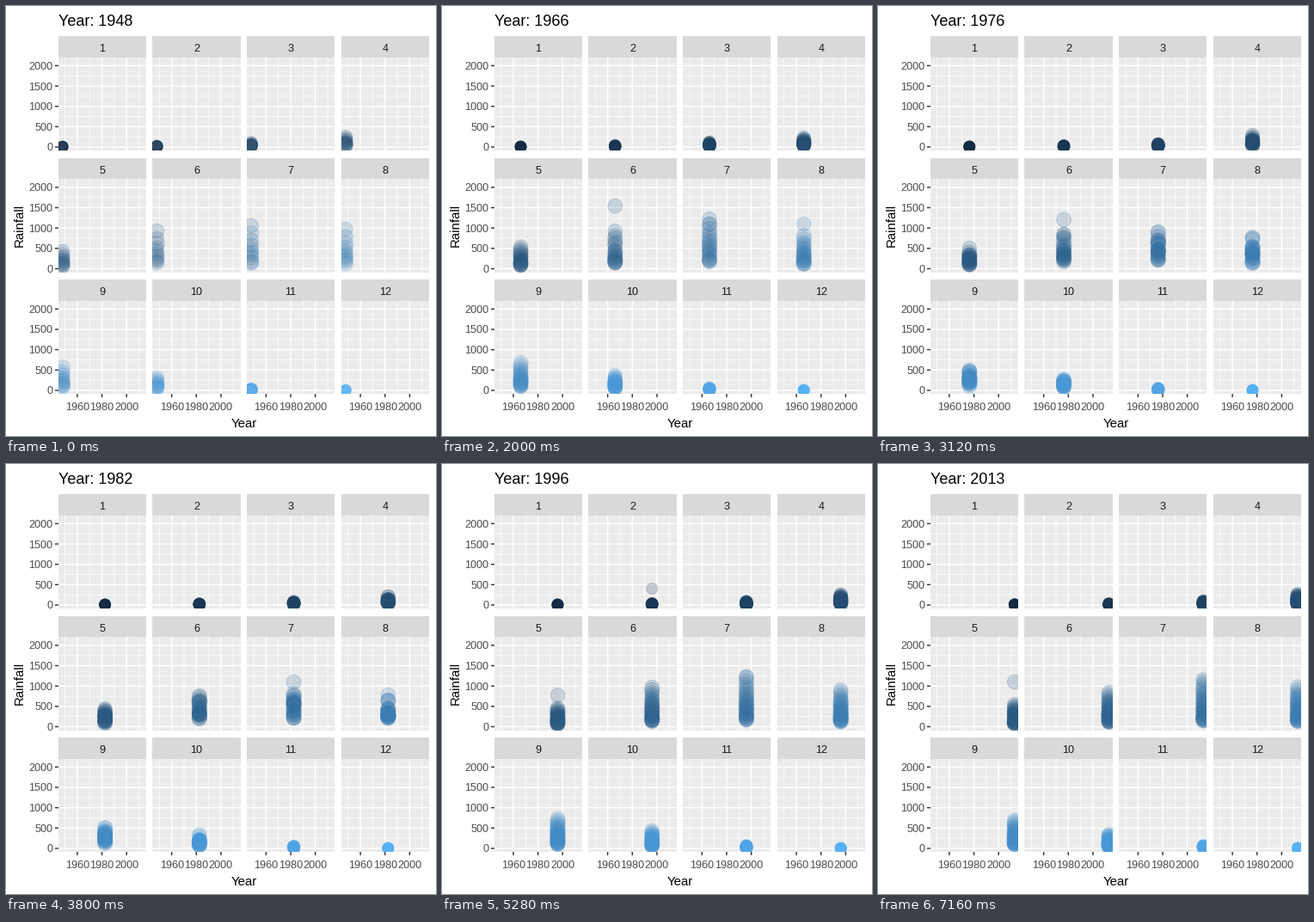
Animation, 500 px wide and 500 px high, one loop 8000 ms. Source, as a matplotlib script:

```python
import numpy as np
import matplotlib.pyplot as plt
from matplotlib.animation import FuncAnimation
from matplotlib.colors import LinearSegmentedColormap
from matplotlib.patches import Rectangle

SIZE, DPI = 500, 100
PX = 72 / DPI                      # points per pixel
FRAMES, INTERVAL = 200, 40
LAST = FRAMES - 21                 # the final year rests to the end of the loop
START, SPAN = 1948, 65
STATIONS = 35

# Panel layout, in pixels from the top left
LEFT, COL_STEP, PANEL_W = 61.07, 109.73, 102.4
TOP, ROW_STEP = 35.5, 141.5
STRIP_H, PANEL_H = 24.5, 108.9
X_SCALE = PANEL_W / 1.1 / SPAN
Y_SCALE = 0.0473

plt.rcParams["font.family"] = "Liberation Sans"
rng = np.random.default_rng(12)

# ---- data -------------------------------------------------------------

MEAN = np.array([7, 18, 45, 110, 240, 430, 470, 390, 290, 170, 28, 5])
# Exceptional rainfall: year, month, amount
STORMS = [(1948, 7, 1060), (1948, 8, 970), (1956, 5, 980), (1966, 6, 1540),
          (1966, 7, 1100), (1966, 8, 1100), (1976, 6, 1600), (1989, 7, 1580),
          (1989, 9, 1130), (1996, 2, 400), (1996, 5, 770), (1996, 7, 1230),
          (2013, 5, 1100), (2013, 7, 1150)]

years = np.arange(SPAN + 1)
marks = np.round(years * LAST / SPAN)
# The network of stations grows quickly, then levels off
counts = np.round(10 + (STATIONS - 10) * np.sin(np.pi / 2 * years / SPAN))
counts = counts.astype(int)

radius = 5.9 + 2.5 * (1 - np.exp(-MEAN / 60))
radius = radius[:, None] + rng.normal(0, 0.22, (12, STATIONS))


def spread(n):
    """Shares of the monthly mean for n stations: dense low, thin high."""
    u = rng.permutation((np.arange(n) + 0.5) / n)
    return 0.3 + 1.5 * u ** 1.4 + 0.5 * u ** 8


def make_rain():
    rain = np.zeros((SPAN + 1, 12, STATIONS))
    for k, n in enumerate(counts):
        for m, mean in enumerate(MEAN):
            rain[k, m, :n] = mean * rng.lognormal(0, 0.12) * spread(n)
    for year, month, amount in STORMS:
        rain[year - START, month - 1, 0] = amount
    return rain


def year_step(frame):
    """Years since the start, and the share of the way to the next."""
    step = round(float(np.interp(frame, marks, years)), 6)
    return int(step), step - int(step)


rain = make_rain()

# ---- stage ------------------------------------------------------------

fig = plt.figure(figsize=(SIZE / DPI, SIZE / DPI), dpi=DPI, facecolor="white")
ax = fig.add_axes([0, 0, 1, 1])
ax.set(xlim=(0, SIZE), ylim=(SIZE, 0))
ax.axis("off")


def year_x(col, year):
    return LEFT + col * COL_STEP + PANEL_W / 22 + (year - START) * X_SCALE


def rain_y(row, value):
    floor = TOP + row * ROW_STEP + STRIP_H + PANEL_H
    return floor - PANEL_H / 22 - value * Y_SCALE


def label(x, y, text, px=12.6, color="#4D4D4D", **kw):
    return ax.text(x, y, text, fontsize=px * PX, color=color, **kw)


def line(x0, y0, x1, y1, color="white", width=1.42):
    ax.plot([x0, x1], [y0, y1], color=color, lw=width * PX, zorder=2,
            solid_capstyle="butt", snap=False)


def box(x0, y0, x1, y1, color):
    patch = Rectangle((x0, y0), x1 - x0, y1 - y0, fc=color, lw=0, zorder=1)
    return ax.add_patch(patch)


def make_panel(m):
    row, col = divmod(m, 4)
    x0, x1 = (int(LEFT + col * COL_STEP + d) for d in (0, PANEL_W))
    y0, y1, y2 = (int(TOP + row * ROW_STEP + d)
                  for d in (0, STRIP_H, STRIP_H + PANEL_H))
    box(x0, y0, x1, y1, "#D9D9D9")
    back = box(x0, y1, x1, y2, "#EBEBEB")
    label((x0 + x1) / 2, y0 + 18, str(m + 1), color="#1A1A1A", ha="center")

    for year in range(1950, 2011, 10):
        x = year_x(col, year)
        major = year % 20 == 0
        line(x, y1, x, y2, width=1.42 if major else 0.71)
        if major and row == 2:
            line(x, y2, x, y2 + 4, "#333333")
            label(x, 469.5, str(year), ha="center")
    for value in range(0, 2001, 250):
        y = rain_y(row, value)
        major = value % 500 == 0
        line(x0, y, x1, y, width=1.42 if major else 0.71)
        if major and col == 0:
            line(x0 - 4, y, x0, y, "#333333")
            label(54.5, y + 4.5, str(value), ha="right")

    color = shades(m / 11)[:3] + (0.2,)
    dots = ax.scatter([], [], facecolors=[color], edgecolors=[color],
                      linewidths=PX, zorder=3)
    dots.set_clip_path(back)
    return dots


shades = LinearSegmentedColormap.from_list(
    "month", ["#132B43", "#326A98", "#56B1F7"])
panels = [make_panel(m) for m in range(12)]

label(276.5, 490, "Year", 15, "black", ha="center")
label(20, 255, "Rainfall", 15, "black", ha="center", va="baseline",
      rotation=90, rotation_mode="anchor")
title = label(61, 23, "", 18, "black")


def draw(frame):
    frame = min(frame, LAST)
    title.set_text(f"Year: {START + round(frame * SPAN / LAST)}")
    k, t = year_step(frame)
    n = counts[k]
    values = (1 - t) * rain[k] + t * rain[min(k + 1, SPAN)]
    for m, dots in enumerate(panels):
        row, col = divmod(m, 4)
        y = rain_y(row, values[m, :n])
        x = np.full(n, year_x(col, START + k + t))
        dots.set_offsets(np.column_stack([x, y]))
        dots.set_sizes((2 * PX * radius[m, :n]) ** 2)
    return [title, *panels]


anim = FuncAnimation(fig, draw, frames=FRAMES, interval=INTERVAL,
                     repeat=True, repeat_delay=0, blit=False)
plt.show()
```
